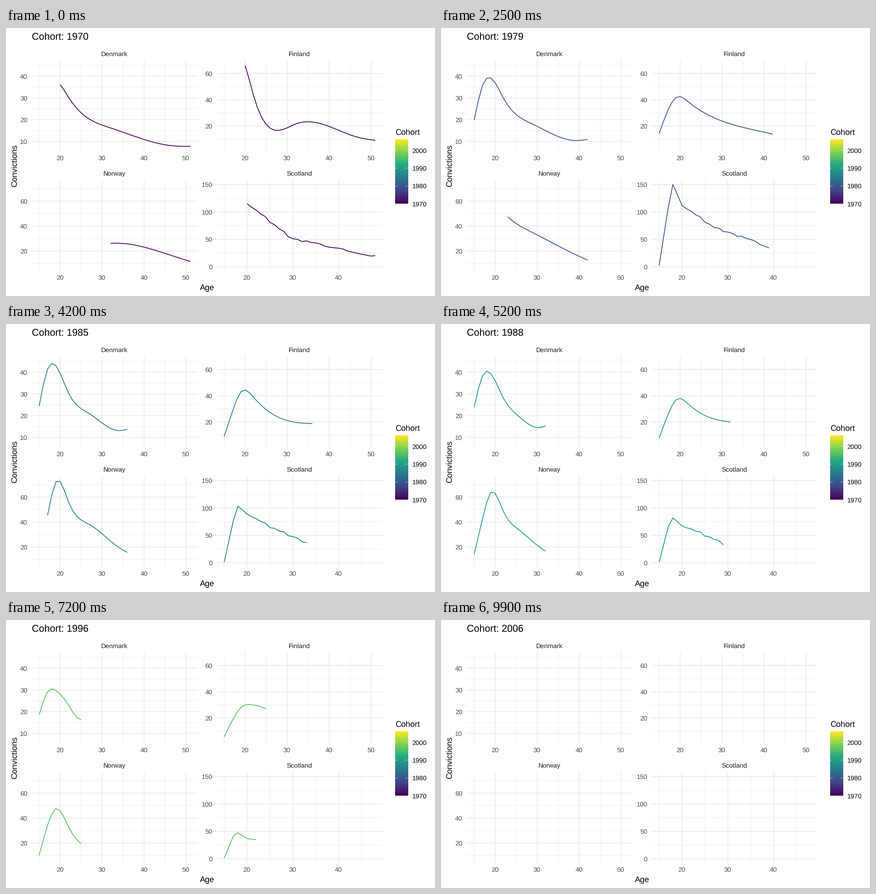
A matplotlib script that plays this animation: 947x592 px, repeating every 10 s.

```python
import numpy as np
import matplotlib.pyplot as plt
from matplotlib.animation import FuncAnimation
from matplotlib.colors import LinearSegmentedColormap

W, H, DPI = 947, 592, 100
PT = 72 / DPI  # points per pixel
FRAMES, FIRST, LAST = 100, 1970, 2006
SPAN = LAST - FIRST

plt.rcParams["font.family"] = "Liberation Sans"
plt.rcParams["text.hinting"] = "none"

# Each row holds the rates of one key cohort: four young ages, then points
# at fixed shares of the way to the last recorded age.
KEYS = [1970, 1975, 1979, 1985, 1993, 2000]
SHARES = np.array([0.35, 0.85, 1])

DENMARK = [
    [15, 31.5, 37.2, 30.3, 16.1, 8.0, 7.7],
    [17.3, 33.5, 37.5, 29.8, 16.4, 8.8, 9.7],
    [19.9, 35.8, 39.2, 29.8, 17.9, 10.4, 10.9],
    [24.4, 41.4, 43, 30.4, 21, 13.1, 13.8],
    [23.4, 35.4, 35.6, 25.5, 18.8, 15.9, 16.9],
    [12.2, 20.9, 22, 19.6, 18.5, 17, 16.8],
]
FINLAND = [
    [36, 62, 72, 43.1, 21.7, 11.6, 9.1],
    [27.6, 41.7, 44.8, 36.2, 23.9, 13.5, 11.4],
    [14.3, 31.4, 41.7, 38.3, 25, 16, 13.8],
    [9, 28.3, 43.1, 38.8, 25.3, 19.1, 18.8],
    [6.6, 21.4, 30.7, 28.3, 25.9, 22.3, 21.4],
    [4.5, 14.7, 24.5, 32, 33, 32, 31],
]
NORWAY = [
    [10, 18, 22, 22, 26.1, 16.2, 11.5],
    [12, 35, 44, 40, 32.7, 16.2, 11.7],
    [15, 40, 56, 51, 34.6, 17.3, 12.7],
    [16, 45.4, 72.4, 56.1, 38.2, 19.8, 15.6],
    [12.2, 39.9, 55.6, 40.4, 30.2, 20.4, 17.8],
    [7.2, 26.9, 36.8, 23, 18, 15, 14],
]
SCOTLAND = [
    [3, 105, 135, 116, 52, 26, 17.7],
    [3, 116, 144.6, 116, 62.4, 36.5, 25.6],
    [2.5, 109, 150.3, 112.4, 74, 45, 34.7],
    [0.8, 76.9, 103.3, 89.7, 68, 44.5, 35.5],
    [2, 55.4, 60.3, 46.3, 46.8, 38.5, 34.7],
    [0, 22.3, 29.8, 26, 22, 18, 16],
]


def spline(q, x, y):
    """Natural cubic spline through (x, y), read at q."""
    n, h = len(x), np.diff(x)
    slope = np.diff(y) / h
    a, r = np.eye(n), np.zeros(n)
    for i in range(1, n - 1):
        a[i, i - 1:i + 2] = h[i - 1], 2 * (h[i - 1] + h[i]), h[i]
        r[i] = 6 * (slope[i] - slope[i - 1])
    m = np.linalg.solve(a, r)
    i = np.clip(np.searchsorted(x, q) - 1, 0, n - 2)
    t = (q - x[i]) / h[i]
    s = 1 - t
    return (s * y[i] + t * y[i + 1]
            + h[i] ** 2 / 6 * ((s**3 - s) * m[i] + (t**3 - t) * m[i + 1]))


fig = plt.figure(figsize=(W / DPI, H / DPI), dpi=DPI, facecolor="white")
ax = fig.add_axes([0, 0, 1, 1])
ax.axis("off")


def label(x, y, s, size, color="black", ha="left", **kw):
    # Ink is aligned without the side bearings of the glyphs; add them back.
    x -= {"left": 0, "center": 0.6, "right": 1.2}[ha]
    return ax.text(x, y, s, fontsize=size * PT, color=color, ha=ha,
                   va="baseline", **kw)


def rule(xs, ys, width, color="#EBEBEB", z=1):
    ax.plot(xs, ys, color=color, lw=width * PT, solid_capstyle="butt",
            snap=False, zorder=z)


class Panel:
    WIDTH, HEIGHT = 367, 200

    def __init__(self, name, left, top, years, xmax, base, unit, major, minor,
                 rates, young=(15, 17, 19, 22), fit=spline, jitter=0):
        self.left, self.base, self.unit = left, base, unit
        self.years, self.young, self.fit = years, young, fit
        self.per_year = self.WIDTH / ((xmax - 15) * 1.1)
        self.pad = (xmax - 15) * 0.05
        self.columns = np.transpose(rates)
        self.noise = jitter * np.random.default_rng(4).normal(size=xmax + 1)
        self.noise[:young[-1]] = 0
        self.grid(name, top, xmax, major, minor)
        self.line, = ax.plot([], [], lw=1.75 * PT, solid_capstyle="butt",
                             solid_joinstyle="round", zorder=3)

    def x(self, age):
        return self.left + (age - 15 + self.pad) * self.per_year

    def y(self, v):
        return self.base - v * self.unit

    def grid(self, name, top, xmax, major, minor):
        right, bottom = self.left + self.WIDTH, top + self.HEIGHT
        for a in range(15, xmax + 1, 5):
            big = a % 10 == 0
            rule([self.x(a)] * 2, [top, bottom], 1.75 if big else 0.88)
            if big:
                label(self.x(a), bottom + 19.5, a, 14.47, "#4D4D4D", "center")
        for v in minor:
            rule([self.left, right], [self.y(v)] * 2, 0.88)
        for v in major:
            rule([self.left, right], [self.y(v)] * 2, 1.75)
            label(self.left - 8.1, self.y(v) + 5.2, v, 14.47, "#4D4D4D",
                  "right")
        label(self.left + self.WIDTH / 2, top - 10.3, name, 14.47, "#1A1A1A",
              "center")

    def show(self, cohort, color):
        first, last = (year - cohort for year in self.years)
        ages = np.arange(max(15, first), last + 1)
        if len(ages) < 2:
            self.line.set_data([], [])
            return
        knee = self.young[-1]
        knots = np.append(self.young, knee + SHARES * max(last - knee, 4))
        vals = np.array([np.interp(cohort, KEYS, c) for c in self.columns])
        rates = self.fit(ages, knots, vals) + self.noise[ages]
        self.line.set_data(self.x(ages), self.y(rates))
        self.line.set_color(color)


panels = [
    Panel("Denmark", 56, 72, (1990, 2021), 51, 298, 4.8,
          range(10, 41, 10), range(15, 46, 10), DENMARK),
    Panel("Finland", 464.4, 72, (1990, 2021), 51, 274, 2.9,
          range(20, 61, 20), range(10, 51, 20), FINLAND),
    Panel("Norway", 56, 336, (2002, 2021), 51, 547, 2.75,
          range(20, 61, 20), range(10, 71, 20), NORWAY),
    Panel("Scotland", 464.4, 336, (1990, 2018), 48, 526.9, 1.209,
          range(0, 151, 50), range(25, 126, 50), SCOTLAND,
          young=(15, 17, 18, 20), fit=np.interp, jitter=1.2),
]

title = label(56.3, 26.5, "", 21.7)
label(443.7, 578.6, "Age", 18.08, ha="center")
label(24.1, 304, "Convictions", 18.08, ha="center", rotation=90,
      rotation_mode="anchor")

# Colour bar
cmap = LinearSegmentedColormap.from_list(
    "cohort", plt.get_cmap("viridis")(np.linspace(0, 1, 6)))
L, R, TOP, BOTTOM = 858.7, 887.1, 246, 388
label(L, 235.5, "Cohort", 18.08)
ax.imshow(np.linspace(1, 0, 256)[:, None], cmap=cmap, aspect="auto",
          extent=(L, R, BOTTOM, TOP), interpolation="bilinear", zorder=1)
for year in range(1970, 2001, 10):
    y = BOTTOM - (year - FIRST) / SPAN * (BOTTOM - TOP)
    for x in (L, R - 5.7):
        rule([x, x + 5.7], [y, y], 0.65, "white", 2)
    label(896.2, y + 5.2, year, 14.47)

# Whole coordinates lie on pixel centres.
ax.set_xlim(-0.5, W - 0.5)
ax.set_ylim(H - 0.5, -0.5)

# Curves switch on rounded times, the title on whole years passed.
starts = np.round(1 + np.arange(SPAN + 1) * (FRAMES - 1) / SPAN) - 1


def draw(k):
    i = int(np.searchsorted(starts, k, "right")) - 1
    title.set_text(f"Cohort: {FIRST + k * SPAN // (FRAMES - 1)}")
    for p in panels:
        p.show(FIRST + i, cmap(i / SPAN))
    return [title] + [p.line for p in panels]


anim = FuncAnimation(fig, draw, frames=FRAMES, interval=100, repeat=True,
                     repeat_delay=0, blit=False)
plt.show()
```
